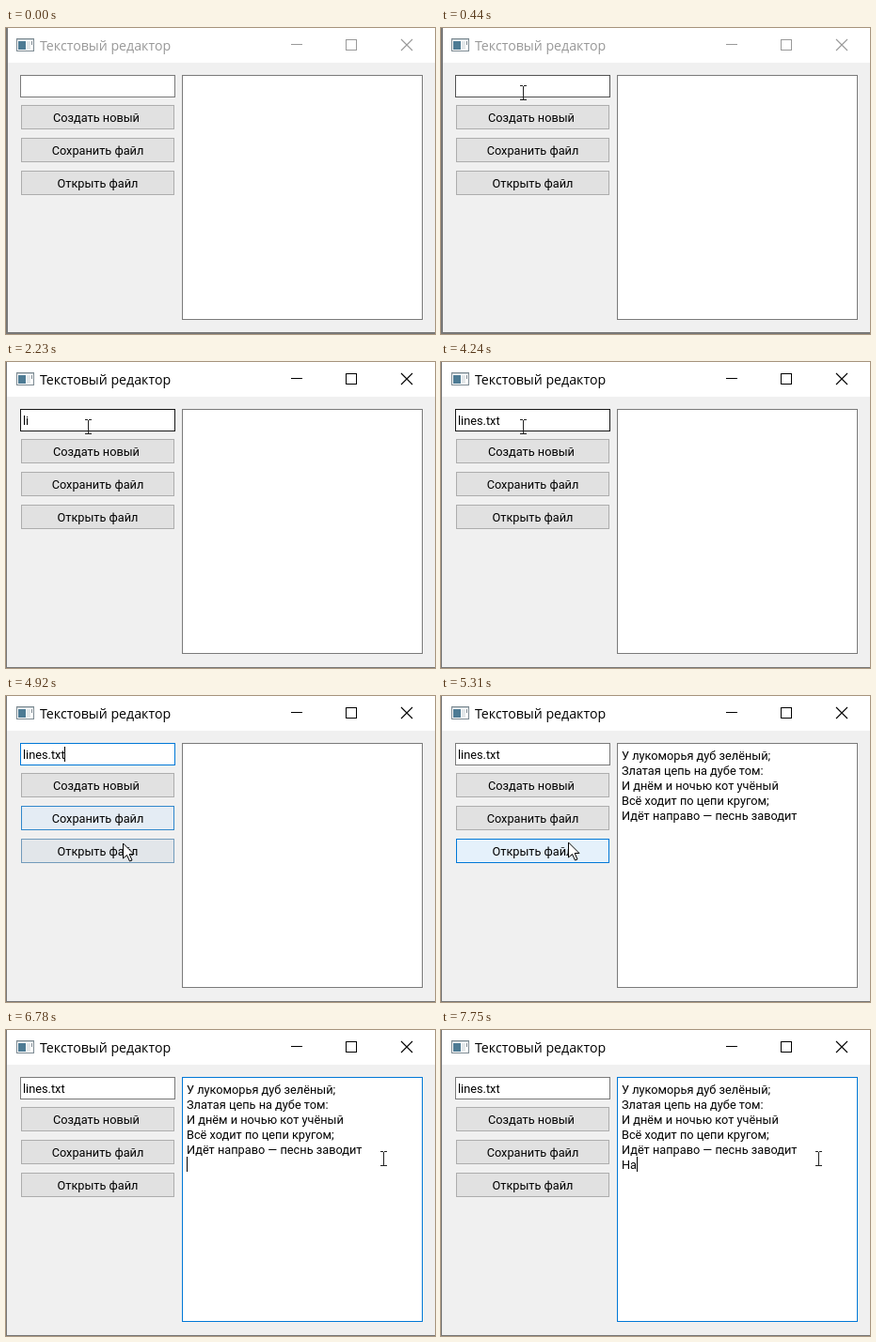
These frames come from a looping animation (456x326 px, 8000 ms). An HTML page with a canvas:

```html
<!DOCTYPE html>
<html lang="ru">
<head>
<meta charset="utf-8">
<title>Текстовый редактор</title>
<style>
  html, body { margin: 0; width: 100%; height: 100%; overflow: hidden; background: #f0f0f0; }
  canvas { display: block; }
</style>
</head>
<body>
<canvas id="stage" width="456" height="326"></canvas>
<script>
const ctx = document.getElementById('stage').getContext('2d');
const LOOP = 8000;
const UI_FONT = '12.75px Roboto, sans-serif';
const TITLE_FONT = '14.2px "Open Sans", sans-serif';
const ACTIVATED = 450, OPENED = 5310, EDITOR_FOCUS = 5950;
const PRESS = [5080, 5200];

const poem = [
  'У лукоморья дуб зелёный;',
  'Златая цепь на дубе том:',
  'И днём и ночью кот учёный',
  'Всё ходит по цепи кругом;',
  'Идёт направо — песнь заводит'
];

const buttons = [
  { label: 'Создать новый', y: 82, center: 96, enter: 4530, leave: 4690 },
  { label: 'Сохранить файл', y: 117, center: 97.5, enter: 4730, leave: 4870 },
  { label: 'Открыть файл', y: 152, center: 97.5, enter: 4870, leave: 5320 }
];

// [time, value]: the value holds until the next entry
const fileName = [[0, ''], [1600, 'li'], [2380, 'lin'], [2460, 'line'], [2540, 'lines'],
  [3000, 'lines.'], [3460, 'lines.t'], [3610, 'lines.tx'], [3690, 'lines.txt']];
const fileCaret = [[0, false], [ACTIVATED, true], [1310, false], [1600, true],
  [2230, false], [2380, true], [4240, false], [4770, true], [PRESS[0], false]];
const editorCaret = [[0, false], [EDITOR_FOCUS, true], [6490, false], [6780, true],
  [7020, false], [7520, true]];
const lastLine = [[0, ''], [7600, 'Н'], [7750, 'На']];

// Pointer travel: [start, end, x0, y0, x1, y1]
const moves = [
  [70, 420, -14, 90, 88, 69],
  [4470, 4920, 88, 69, 124, 157],
  [5250, 5780, 124, 157, 427, 122],
  [6100, 6320, 427, 122, 402, 137]
];
const clicks = [[ACTIVATED, 640], [PRESS[0], 5240], [EDITOR_FOCUS, 6120]];

const clamp = v => Math.max(0, Math.min(1, v));
const ease = v => v * v * (3 - 2 * v);
const during = (t, [from, to]) => t >= from && t < to;

function held(steps, t) {
  let value;
  for (const [time, v] of steps) if (t >= time) value = v;
  return value;
}

function mix(a, b, k) {
  return `rgb(${a.map((v, i) => Math.round(v + (b[i] - v) * k))})`;
}

function pointerAt(t) {
  let [, , x, y] = moves[0];
  for (const [from, to, x0, y0, x1, y1] of moves) {
    if (t < from) break;
    const k = ease(clamp((t - from) / (to - from)));
    x = x0 + (x1 - x0) * k;
    y = y0 + (y1 - y0) * k;
  }
  return { x: Math.round(x), y: Math.round(y) };
}

function rect(x, y, w, h, color) {
  ctx.fillStyle = color;
  ctx.fillRect(x, y, w, h);
}

function box(x, y, w, h, border, fill) {
  rect(x, y, w, h, border);
  rect(x + 1, y + 1, w - 2, h - 2, fill);
}

function text(str, x, y, color = '#000', font = UI_FONT, align = 'left') {
  ctx.font = font;
  ctx.fillStyle = color;
  ctx.textAlign = align;
  ctx.fillText(str, x, y);
}

function caret(str, x, y) {
  ctx.font = UI_FONT;
  rect(Math.floor(x + ctx.measureText(str).width), y, 1, 16, '#000');
}

function drawFrame(active) {
  const ink = active ? '#000' : '#999';
  rect(0, 0, 456, 326, '#f0f0f0');
  rect(0, 0, 456, 37, '#fff');
  const edge = active ? 1 : 2;
  rect(0, 0, edge, 326, '#777');
  rect(0, 326 - edge, 456, edge, '#777');

  box(11, 11, 19, 14, '#7d8a92', '#fff');
  rect(12, 12, 17, 1, '#c3cdd2');
  rect(13, 14, 8, 9, '#4d7b94');
  rect(22, 14, 4, 9, '#e4e8ea');
  rect(27, 14, 1, 4, '#7d8a92');
  text('Текстовый редактор', 36, 24, ink, TITLE_FONT);

  rect(303, 17, 12, 1, ink);
  box(361, 12, 12, 12, ink, '#fff');
  ctx.strokeStyle = ink;
  ctx.lineWidth = 1.1;
  ctx.beginPath();
  ctx.moveTo(420, 12);
  ctx.lineTo(432, 24);
  ctx.moveTo(432, 12);
  ctx.lineTo(420, 24);
  ctx.stroke();
}

function drawInput(t) {
  const gray = [122, 122, 122], dark = [23, 23, 23], blue = [0, 120, 215];
  let border = mix(gray, dark, clamp((t - 380) / 150));
  if (t >= 4510) border = mix(dark, blue, clamp((t - 4510) / 400));
  if (t >= PRESS[0]) border = mix(blue, gray, clamp((t - PRESS[0]) / 150));
  box(15, 50, 165, 24, border, '#fff');
  const name = held(fileName, t);
  text(name, 18, 67);
  if (held(fileCaret, t)) caret(name, 18, 54);
}

function drawButton({ label, y, center, enter, leave }, t) {
  const hover = clamp((Math.min(t, leave) - enter) / 150) * (1 - clamp((t - leave) / 220));
  const pressed = y === 152 && during(t, PRESS);
  const border = pressed ? '#005499' : mix([173, 173, 173], [0, 120, 215], hover);
  const fill = pressed ? '#cce4f7' : mix([225, 225, 225], [229, 241, 251], hover);
  box(16, y, 163, 26, border, fill);
  text(label, center, y + 18, '#000', UI_FONT, 'center');
}

function drawEditor(t) {
  box(187, 50, 256, 261, t >= EDITOR_FOCUS ? '#0078d7' : '#7a7a7a', '#fff');
  if (t < OPENED) return;
  const lines = t < 6780 ? poem : [...poem, held(lastLine, t)];
  lines.forEach((line, i) => text(line, 192, 68 + 16 * i));
  const row = lines.length - 1;
  if (held(editorCaret, t)) caret(lines[row], 192, 55 + 16 * row);
}

function drawIBeam(x, y) {
  rect(x - 1, y - 6, 1, 14, '#222');
  for (const edge of [y - 8, y + 7]) {
    rect(x - 4, edge, 3, 1, '#222');
    rect(x, edge, 3, 1, '#222');
  }
  rect(x - 1, y - 7, 1, 1, '#222');
}

function drawArrow(x, y) {
  const outline = [[0, 0], [0, 16], [4, 12.5], [7, 19], [9.5, 18], [6.7, 11.5], [11.5, 11.5]];
  ctx.beginPath();
  outline.forEach(([dx, dy]) => ctx.lineTo(x + dx + 0.5, y + dy));
  ctx.closePath();
  ctx.fillStyle = '#fff';
  ctx.fill();
  ctx.strokeStyle = '#000';
  ctx.lineWidth = 1;
  ctx.stroke();
}

function drawPointer(t) {
  if (t < 70) return;
  const { x, y } = pointerAt(t);
  if (clicks.some(span => during(t, span))) {
    ctx.globalCompositeOperation = 'multiply';
    ctx.fillStyle = '#ffff80';
    ctx.beginPath();
    ctx.arc(x - 2, y, 15, 0, 2 * Math.PI);
    ctx.fill();
    ctx.globalCompositeOperation = 'source-over';
  }
  const inInput = x >= 15 && x < 180 && y >= 50 && y < 74;
  const inEditor = x >= 187 && x < 443 && y >= 50 && y < 311;
  (inInput || inEditor ? drawIBeam : drawArrow)(x, y);
}

function render(t) {
  drawFrame(t >= ACTIVATED);
  drawInput(t);
  buttons.forEach(button => drawButton(button, t));
  drawEditor(t);
  drawPointer(t);
}

const start = performance.now();
function tick() {
  render((performance.now() - start) % LOOP);
  requestAnimationFrame(tick);
}
tick();
</script>
</body>
</html>
```
